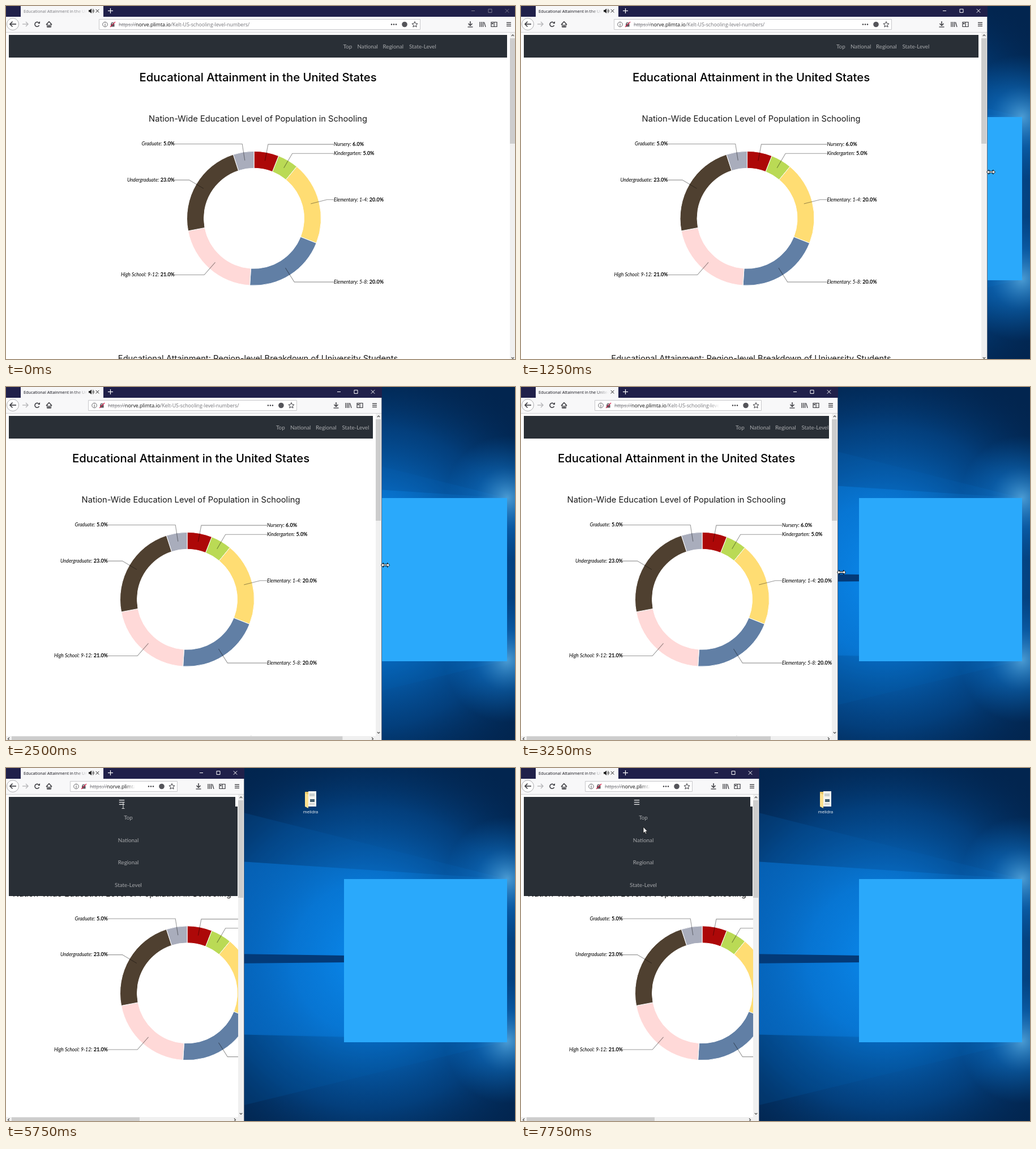
Animation of 899x623 px, one loop 8 s. Source, as an HTML page with a canvas:

```html
<!DOCTYPE html>
<html lang="en">
<head>
<meta charset="utf-8">
<title>Educational Attainment</title>
<style>
html, body { margin: 0; width: 100%; height: 100%; overflow: hidden; background: #fff; }
canvas { display: block; }
</style>
</head>
<body>
<canvas id="stage" width="899" height="623"></canvas>
<script>
const ctx = document.getElementById('stage').getContext('2d');
const STEP = 250, LOOP = 8000, TAU = Math.PI * 2;

// Window width and menu opening, one entry per step
const widths = [901, 901, 890, 868, 846, 824, 787, 760, 733, 698, 664, 629, 595, 560, 530, 501, 523, 419, 421];
const menuOpen = { 22: .6, 23: 1, 24: 1, 25: 1, 26: .4, 29: .6, 30: 1, 31: 1 };

const slices = [
  ['Nursery:', 6, '#ad0808'], ['Kindergarten:', 5, '#bada55'],
  ['Elementary: 1-4:', 20, '#ffdd73'], ['Elementary: 5-8:', 20, '#617fa5'],
  ['High School: 9-12:', 21, '#ffd9d8'], ['Undergraduate:', 23, '#4f4030'],
  ['Graduate:', 5, '#a9adbc']
];
const navItems = [['Top', 165], ['National', 140], ['Regional', 95], ['State-Level', 48.5]];
const UI = '"Open Sans", sans-serif', HEAD = 'Inter, sans-serif', BODY = 'Lato, sans-serif';
const DARK = '#292f36', ICON = '#38383d';

const clamp = (v, lo, hi) => Math.max(lo, Math.min(hi, v));

function rect(x, y, w, h, color) {
  ctx.fillStyle = color;
  ctx.fillRect(x, y, w, h);
}
function path(points, closed) {
  ctx.beginPath();
  points.forEach(([x, y]) => ctx.lineTo(x, y));
  if (closed) ctx.closePath();
}
function line(points, color = ICON, width = 1.2, closed = false) {
  path(points, closed);
  ctx.strokeStyle = color;
  ctx.lineWidth = width;
  ctx.stroke();
}
function poly(points, color) {
  path(points, true);
  ctx.fillStyle = color;
  ctx.fill();
}
function ring(x, y, r, color, width = 1, from = 0, to = TAU) {
  ctx.beginPath();
  ctx.arc(x, y, r, from, to);
  ctx.strokeStyle = color;
  ctx.lineWidth = width;
  ctx.stroke();
}
function disc(x, y, r, color) {
  ctx.beginPath();
  ctx.arc(x, y, r, 0, TAU);
  ctx.fillStyle = color;
  ctx.fill();
}
function text(str, x, y, font, color = '#000', align = 'left') {
  ctx.font = font;
  ctx.textAlign = align;
  ctx.fillStyle = color;
  ctx.fillText(str, x, y);
  return ctx.measureText(str).width;
}
function clipped(x, y, w, h, draw) {
  ctx.save();
  ctx.beginPath();
  ctx.rect(x, y, w, h);
  ctx.clip();
  draw();
  ctx.restore();
}
function fade(from, to, color) {
  const g = ctx.createLinearGradient(from, 0, to, 0);
  g.addColorStop(0, color);
  g.addColorStop(1, color + '00');
  return g;
}
function glow(x, y, r, ...colors) {
  const g = ctx.createRadialGradient(x, y, 0, x, y, r);
  colors.forEach((c, i) => g.addColorStop(i / (colors.length - 1), c));
  rect(0, 0, 899, 623, g);
}
function stripes(x, y, w, gap, color, width) {
  for (const d of [-gap, 0, gap]) line([[x - w, y + d], [x + w, y + d]], color, width);
}
function cross(x, y, r, color, width = 1) {
  line([[x - r, y - r], [x + r, y + r]], color, width);
  line([[x + r, y - r], [x - r, y + r]], color, width);
}

function desktop() {
  rect(0, 0, 899, 623, '#02254f');
  glow(640, 335, 400, '#0a8cf0', '#0878d8e0', '#0458a880', '#02254f00');
  const beam = ctx.createLinearGradient(400, 0, 760, 0);
  beam.addColorStop(0, '#0670d0b0');
  beam.addColorStop(1, '#0a90f530');
  poly([[885, 196], [400, 164], [400, 470], [885, 482]], beam);
  poly([[885, 196], [400, 74], [400, 164]], '#0560b038');
  poly([[885, 482], [400, 600], [400, 468]], '#0560b030');
  poly([[400, 328], [600, 331], [600, 343], [400, 345]], '#033a78');
  glow(885, 196, 110, '#6cc8ffb0', '#1890f050', '#0a80e000');
  glow(885, 482, 110, '#6cc8ffb0', '#1890f050', '#0a80e000');
  rect(597, 196, 288, 288, '#2aa9fb');

  poly([[528, 42], [536, 42], [538, 44], [544, 44], [544, 68], [528, 68]], '#e9c766');
  rect(534, 41, 14, 27, '#f4f4f0');
  rect(536, 45, 9, 5, '#c9cfd0');
  rect(537, 55, 8, 5, '#466070');
  rect(536, 63, 9, 1, '#aaa');
  poly([[528, 44], [534, 47], [534, 71], [528, 68]], '#fbe090');
  text('melidra', 538, 79.5, '7.4px ' + UI, '#fff', 'center');
}

function titleBar(W, active, sound) {
  rect(0, 0, W, 19, '#20204a');
  rect(26, 0, 146, 19, '#f7f7f8');
  const end = sound ? 143 : 154;
  clipped(26, 0, end - 26, 19, () =>
    text('Educational Attainment in the United States', 31, 11.5, '7.3px ' + UI,
      fade(end - 22, end, active ? '#101018' : '#77777c')));
  if (sound) {
    poly([[146, 7], [148, 7], [151, 4.5], [151, 13], [148, 10.5], [146, 10.5]], '#222');
    ring(151, 8.7, 2.5, '#222', 1, -1, 1);
    ring(151, 8.7, 4.3, '#222', 1, -1, 1);
  }
  cross(161.5, 8.7, 2.8, '#222');
  line([[180, 8.5], [189, 8.5]], '#fff');
  line([[184.5, 4], [184.5, 13]], '#fff');
  const control = active ? '#fff' : '#77778c';
  line([[W - 79, 8.5], [W - 73, 8.5]], control, 1);
  line([[W - 49, 5.5], [W - 43, 5.5], [W - 43, 11.5], [W - 49, 11.5]], control, 1, true);
  cross(W - 16, 8.5, 3.2, control);
}

function toolbar(W) {
  rect(0, 19, W, 28, '#f8f8f9');
  rect(0, 46, W, 1, '#d2d2d4');
  disc(12, 32, 10.5, '#fff');
  ring(12, 32, 10.5, '#b0b0b3');
  line([[18, 32], [7, 32]], ICON, 1.6);
  line([[11.5, 27.5], [7, 32], [11.5, 36.5]], ICON, 1.6);
  line([[29, 32], [39, 32]], '#b5b5b8', 1.4);
  line([[35, 28], [39, 32], [35, 36]], '#b5b5b8', 1.4);
  ring(55, 32.3, 4, ICON, 1.5, .5, 5.4);
  poly([[56, 31], [60, 31], [60, 27]], ICON);
  line([[71, 33], [76, 27.5], [81, 33]], ICON, 1.5);
  line([[73, 32], [73, 37], [79, 37], [79, 32]], ICON, 1.5);
  rect(75, 33, 2, 4, ICON);

  // The flexible spacers beside the address field shrink with the window
  const spacer = clamp(17 + (W - 560) * .145, 0, 51);
  const L = 113 + spacer, R = W - 118 - spacer;
  rect(L, 23, R - L, 19, '#fff');
  line([[L + .5, 23.5], [R - .5, 23.5], [R - .5, 41.5], [L + .5, 41.5]], '#c8c8cb', 1, true);
  ring(L + 11, 32.5, 4.3, '#66666a');
  rect(L + 10.5, 31.5, 1, 4, '#555');
  rect(L + 10.5, 29.5, 1, 1, '#555');
  rect(L + 21, 31.5, 6.5, 5, '#55555a');
  ring(L + 24.2, 31.5, 2.2, '#55555a', 1.2, Math.PI, TAU);
  line([[L + 20, 37], [L + 29, 28]], '#d7264f', 1.3);
  clipped(L, 23, R - 75 - L, 19, () => {
    const font = '8.8px ' + UI, tone = c => fade(R - 92, R - 75, c);
    let x = L + 35;
    const scheme = text('https://', x, 35.8, font, tone('#85858a'));
    line([[x, 33], [x + scheme, 33]], '#85858a', .8);
    x += scheme;
    x += text('norve.plimta.io', x, 35.8, font, tone('#0c0c0d'));
    text('/Kelt-US-schooling-level-numbers/', x, 35.8, font, tone('#737378'));
  });
  for (const d of [-4, 0, 4]) disc(R - 47 + d, 32.5, 1.2, ICON);
  disc(R - 28, 32.5, 4.8, '#55555a');
  const star = Array.from({ length: 10 }, (_, i) => {
    const r = i % 2 ? 2.4 : 5.3, a = i * TAU / 10;
    return [R - 10 + r * Math.sin(a), 32.8 - r * Math.cos(a)];
  });
  line(star, ICON, 1, true);

  const d = W - 81;
  line([[d, 27], [d, 34]], ICON, 1.5);
  line([[d - 3.5, 31], [d, 34.5], [d + 3.5, 31]], ICON, 1.5);
  line([[d - 4.5, 37], [d + 4.5, 37]], ICON, 1.3);
  for (const x of [-4, -1.2, 1.6]) line([[W - 60 + x, 28], [W - 60 + x, 37]], ICON, 1.3);
  line([[W - 56.5, 28.5], [W - 54, 37]], ICON, 1.2);
  line([[W - 44, 28.5], [W - 34, 28.5], [W - 34, 36.5], [W - 44, 36.5]], ICON, 1.2, true);
  rect(W - 39.5, 28, 1.2, 9, ICON);
  rect(W - 43, 30, 2.5, 2, ICON);
  stripes(W - 13, 32.3, 4, 3, ICON, 1.3);
}

function donut(x, y) {
  const at = (a, r) => [x + r * Math.sin(a), y - r * Math.cos(a)];
  let sum = 0;
  const parts = slices.map(([name, percent, color]) => {
    const from = sum / 100 * TAU;
    sum += percent;
    return { name, percent, color, from, to: sum / 100 * TAU };
  });
  const quarter = TAU / 4;
  for (const { color, from, to } of parts) {
    ctx.beginPath();
    ctx.arc(x, y, 118.5, from - quarter, to - quarter);
    ctx.arc(x, y, 88.5, to - quarter, from - quarter, true);
    ctx.closePath();
    ctx.fillStyle = color;
    ctx.fill();
    ctx.strokeStyle = '#fff';
    ctx.lineWidth = 1;
    ctx.stroke();
  }
  const plain = 'italic 8.7px ' + BODY, bold = 'bold 9px ' + BODY;
  for (const { name, percent, from, to } of parts) {
    const mid = (from + to) / 2, right = mid < TAU / 2;
    const elbow = at(mid, 133), base = elbow[1] + 2.8;
    const anchor = x + (right ? 141 : -140), value = percent + '.0%';
    line([at(mid, 103.5), elbow, [anchor, elbow[1]]], 'rgba(0,0,0,.4)', 1.1);
    if (right) {
      const w = text(name, anchor, base, plain);
      text(value, anchor + w + 2.5, base, bold);
    } else {
      const w = text(value, anchor, base, bold, '#000', 'right');
      text(name, anchor - w - 2.5, base, plain, '#000', 'right');
    }
  }
}

function page(W, open) {
  const mobile = W < 450, center = (W - 11) / 2, drop = mobile ? 22.5 : 0;
  const title = '500 20.3px ' + HEAD, sub = '14.68px ' + HEAD, nav = '9.8px ' + BODY;
  const lines = mobile ? ['Educational Attainment in the United', 'States']
    : ['Educational Attainment in the United States'];
  lines.forEach((s, i) => text(s, center, 132.5 + i * 22.5, title, '#000', 'center'));
  text('Nation-Wide Education Level of Population in Schooling', center, 204.3 + drop, sub, '#1a1a1a', 'center');
  text('Educational Attainment: Region-level Breakdown of University Students',
    center, 626.5 + drop, sub, '#1a1a1a', 'center');
  donut(Math.max(320, center - 7), 374.8 + drop);

  rect(5, 51, W - 21, 40, DARK);
  if (!mobile) {
    const right = Math.min(center + 315.5, W - 16);
    clipped(5, 51, W - 21, 40, () =>
      navItems.forEach(([s, back]) => text(s, right - back, 74.5, nav, '#a6a8ab')));
    return;
  }
  if (open) clipped(5, 68, W - 17, 158 * open, () => {
    rect(5, 68, W - 17, 158, DARK);
    navItems.forEach(([s], i) => text(s, center + 11, 91 + i * 39.5, nav, '#a6a8ab', 'center'));
  });
  stripes(center - .5, 60.5, 4.7, 3.8, '#dcdddf', 1.4);
}

function scrollbars(W) {
  const wide = W < 687, mobile = W < 450, x = W - 11, mid = W - 6;
  rect(x, 47, 10, 576, '#f0f0f0');
  rect(x, 57, 9, (mobile ? 229 : wide ? 236 : 243) - 57, '#cdcdcd');
  line([[mid - 2.2, 53], [mid, 50.8], [mid + 2.2, 53]], '#505050');
  const foot = wide ? 610 : 621;
  line([[mid - 2.2, foot - 1], [mid, foot + 1.2], [mid + 2.2, foot - 1]], '#505050');
  if (wide) {
    rect(0, 616, W - 1, 7, '#f0f0f0');
    rect(10, 616.5, 223 + (W - 419) * 1.475, 6.5, '#cdcdcd');
    line([[6, 618.5], [3.5, 621], [6, 623.5]], '#505050');
    line([[W - 18, 618.5], [W - 15.5, 621], [W - 18, 623.5]], '#505050');
  }
  rect(W - 1, 19, 1, 604, '#5a6a80');
}

function resizeCursor(x, y) {
  const half = [[-7.5, 0], [-3.5, -4], [-3.5, -1.3], [3.5, -1.3], [3.5, -4], [7.5, 0],
    [3.5, 4], [3.5, 1.3], [-3.5, 1.3], [-3.5, 4]].map(([a, b]) => [x + a, y + b]);
  poly(half, '#fff');
  line(half, '#000', 1, true);
}
function arrowCursor(x, y) {
  const shape = [[0, 0], [0, 11], [2.5, 8.7], [4.2, 12.3], [5.8, 11.5], [4.2, 8], [7.5, 8]]
    .map(([a, b]) => [x + a, y + b]);
  poly(shape, '#fff');
  line(shape, '#111', .8, true);
}
function textCursor(x, y) {
  line([[x - 2.5, y - 5.5], [x + 2.5, y - 5.5]], '#ddd', 1);
  line([[x, y - 5.5], [x, y + 5.5]], '#ddd', 1);
  line([[x - 2.5, y + 5.5], [x + 2.5, y + 5.5]], '#ddd', 1);
}
function cursor(step, W) {
  if (step < 2) return;
  if (step < 18) resizeCursor(W + (step === 17 ? 10 : 6), 293 + (step - 5) * 4.25);
  else if (step < 21) {
    const k = (step - 17) / 4;
    arrowCursor(429 - 222 * k, 344 - 284 * k);
  } else if (step < 30) textCursor(207, 66);
  else arrowCursor(216, step === 30 ? 90 : 104);
}

function draw(now) {
  const step = Math.floor((now % LOOP) / STEP);
  const W = widths[Math.min(step, widths.length - 1)];
  ctx.lineJoin = 'miter';
  desktop();
  clipped(0, 0, W, 623, () => {
    rect(0, 0, W, 623, '#fff');
    clipped(0, 47, W - 11, 576, () => page(W, menuOpen[step] || 0));
    titleBar(W, step > 1, step < 11 || step > 17);
    toolbar(W);
    scrollbars(W);
  });
  cursor(step, W);
}

const start = performance.now();
function loop() {
  draw(performance.now() - start);
  requestAnimationFrame(loop);
}
loop();
</script>
</body>
</html>
```
